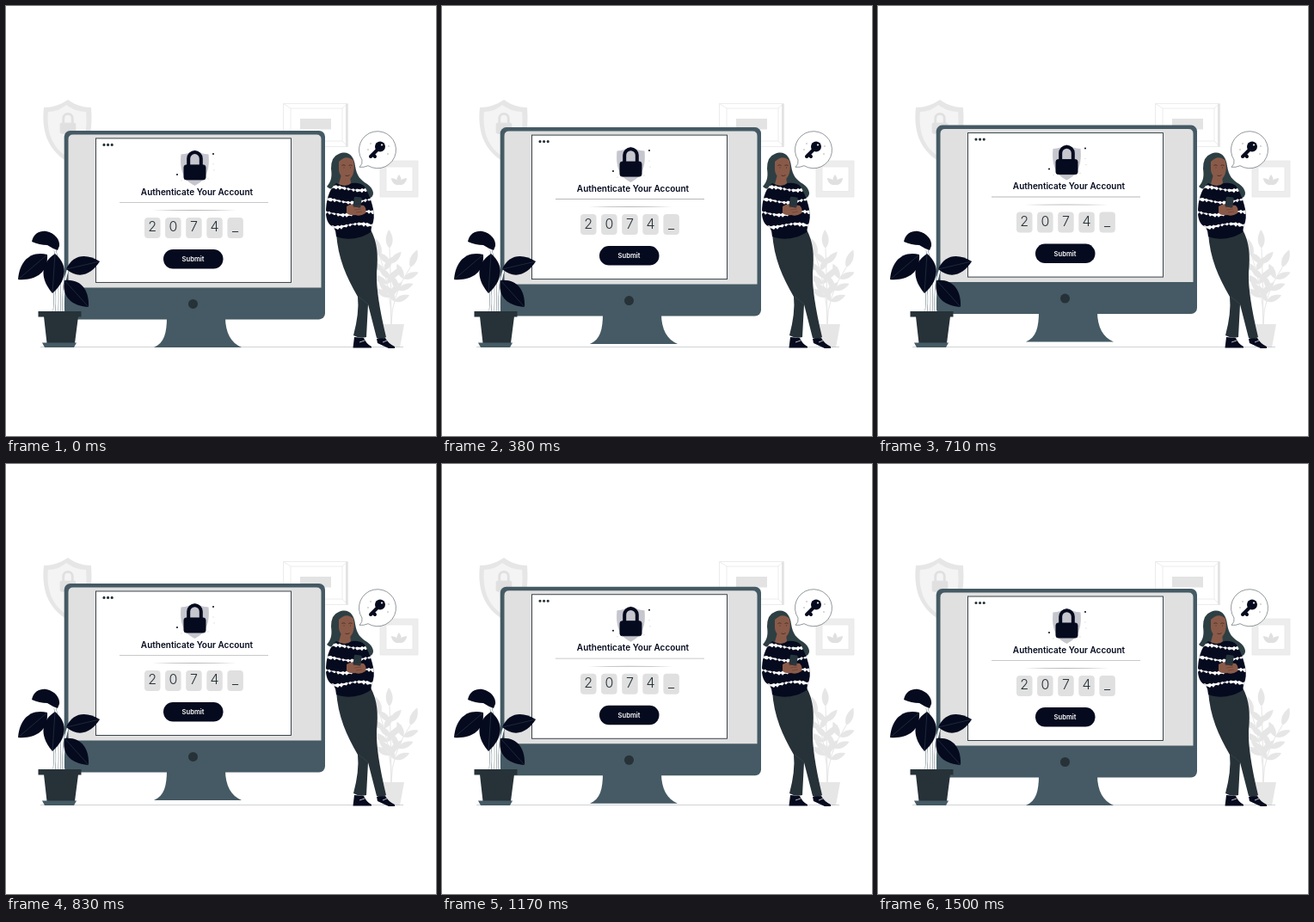
An HTML page that plays this animation: 500x500 px, repeating every 1540 ms.

```html
<!DOCTYPE html>
<html lang="en">
<head>
<meta charset="utf-8">
<title>Authenticate Your Account</title>
<style>
  html, body { margin: 0; height: 100%; overflow: hidden; background: #fff; }
  svg { display: block; width: 100vw; height: 100vh; }
  text { font-family: Inter, sans-serif; text-anchor: middle; }
  .navy { fill: #050a1e; }
  .dark { fill: #263238; }
  .slate { fill: #455a64; }
  .skin { fill: #8a5a49; }
  .hair { fill: #2d3f43; }
  .pale { fill: #e6e6e6; }
  .line { fill: none; stroke: #455a64; stroke-width: .4; }
</style>
</head>
<body>
<svg viewBox="0 0 500 500">
  <defs>
    <path id="leaf" d="M0 0C-8-6-6-14 0-20C6-14 8-6 0 0Z"/>
    <g id="padlock">
      <path fill="none" stroke-width="4" d="M-7.300 2V-7.500a7.300 7.300 0 0 1 14.600 0V2"/>
      <rect x="-12.500" width="25" height="17" rx="2.500"/>
    </g>
  </defs>

  <!-- wall shield -->
  <g id="wallShield" transform="translate(72 145)">
    <path id="shield" fill="#e6e6e6" d="M0-36C8-30 18-27 27-27C29 1 26 23 0 36C-24 23-31-1-28-27C-18-27-9-30 0-36Z"/>
    <use href="#padlock" transform="translate(0 -9) scale(.72)" fill="#e0e0e0" stroke="#e0e0e0"/>
  </g>
  <path fill="#f4f4f4" d="M70 115C77 120 85 123 93 123C95 145 92 164 71 175C52 164 47 143 49 123C57 123 64 120 70 115Z"/>
  <use href="#padlock" transform="translate(72 136) scale(.72)" fill="#e0e0e0" stroke="#e0e0e0"/>

  <!-- wall pictures -->
  <g fill="#fff" stroke="#e8e8e8" stroke-width=".8">
    <path d="M322.500 113.500H397.500V163.500H322.500ZM331 119H391V157H331ZM322.500 113.500L331 119M391 119L397 113.500M391 157L397 163"/>
    <path fill="#ededed" d="M435 180H479V222H435Z"/>
    <path d="M442 187H473V215.500H442Z"/>
  </g>
  <path fill="#e3e3e3" d="M395 114h2.500v50h-2.500zM342 131h36v12.500h-36z"/>
  <g id="emblem" fill="#e0e0e0" transform="translate(457 208)"></g>

  <g id="palePlant" class="pale">
    <path d="M432 370H463L458 397H438Z"/>
  </g>
  <path fill="none" stroke="#b9c0c4" stroke-width=".7" d="M40 396.500H462"/>

  <g id="monitor">
    <path class="slate" d="M187 362C187 380 184 392 172 397H274C262 392 255 380 255 362Z"/>
    <rect class="slate" x="67.700" y="145" width="303.300" height="219.500" rx="7"/>
    <path fill="#e0e0e0" d="M72.500 327.500V155Q72.500 149.500 78 149.500H361Q366.500 149.500 366.500 155V327.500Z"/>
    <circle class="dark" cx="217.500" cy="346.500" r="5.500"/>
    <rect x="104.500" y="154" width="227" height="167.500" fill="#fff" stroke="#263238" stroke-width=".9"/>
    <path stroke="#263238" stroke-width="3.200" stroke-linecap="round" d="M114 161.500h0m4.600 0h0m4.600 0h0"/>
    <use href="#shield" transform="translate(219.500 188) scale(.56)" opacity=".99"/>
    <path fill="#c6c6ce" d="M219.500 167.500Q226 172 235.500 172.500C237 189 234 202 219.500 209C205 202 202 189 203.500 172.500Q213 172 219.500 167.500Z"/>
    <use href="#padlock" class="navy" stroke="#050a1e" transform="translate(219.500 185)"/>
    <path stroke="#050a1e" stroke-width="2" stroke-linecap="round" d="M241 172h0M199 196h0"/>
    <path stroke="#8c8f98" stroke-width=".6" stroke-linecap="round" d="M241 184h0M242 191h0M235 201h0M204 203h0"/>
    <text class="navy" x="222" y="219.700" font-size="10" font-weight="600">Authenticate Your Account</text>
    <path fill="#b8b8b8" d="M132 228h173v.8h-173zM170 237.500Q218 236.500 268 237.500Q218 238.500 170 237.500Z"/>
    <g id="code"></g>
    <rect class="navy" x="183" y="283" width="69.500" height="22.500" rx="11.200"/>
    <text x="217.500" y="297" font-size="7.600" font-weight="600" fill="#fff">Submit</text>
  </g>

  <!-- potted plant -->
  <path id="stems" fill="none" stroke="#455a64" stroke-width="2.800" d="M56 355Q58 335 55 325M62 355C63 325 61 300 57 284M67 355Q66 320 73 304"/>
  <use href="#stems" style="stroke:#fff" transform="translate(.3 0)" stroke="#fff" opacity="0"/>
  <path fill="none" stroke="#fff" stroke-width="2.100" d="M56 355Q58 335 55 325M62 355C63 325 61 300 57 284M67 355Q66 320 73 304"/>
  <path class="navy" d="M30 274C32 264 40 261 47 262C57 264 63 272 62 279L60 284Q54 282 48 278Q39 278 30 274Z"/>
  <g id="plant" class="navy"></g>
  <path class="dark" d="M37.500 355H87.500V361.500H37.500ZM44 361H84L80 392H47.500Z"/>
  <path class="slate" d="M42 391.500H82L79 397H45Z"/>

  <!-- woman -->
  <path class="hair" d="M387 172C398 167 405 175 406 186C408 198 412 202 420 207C428 213 429 220 424 223C417 225 410 221 405 217L385 212Q378 215 373 210C379 203 379 197 378 189Q378 175 387 172Z"/>
  <path class="skin" d="M390 196L387 207Q394 213 401 206L400 198Z"/>
  <path class="skin" d="M387 181Q396 172 404 180C406 190 404 198 399 202C392 202 387 196 387 190Z"/>
  <path fill="none" stroke="#35201f" stroke-width=".7" d="M390.500 185.500q2-1.500 4 0M398.500 185.500q2-1.300 4 0M392.500 188h1M400 188h1M394.500 197q3 1.500 5-.500"/>
  <path class="dark" d="M384 264C396 270 412 269 424 260C432 275 433 290 431 310Q430 335 442 385Q436 389 431 386L421 347L419 385Q411 387 404 383Q411 357 409 338C396 315 386 294 384 264Z"/>
  <path class="line" d="M410 338Q416 342 421 347"/>
  <path id="sweater" class="navy" d="M384 206C375 213 372 228 372 240C372 250 376 255 381 257Q384 262 384 268C396 273 412 271 424 263Q425 256 427 251C430 240 424 222 417 210Q412 205 402 206Q394 212 384 206Z"/>
  <clipPath id="body"><use href="#sweater"/></clipPath>
  <g id="stripes" clip-path="url(#body)" fill="#fff"></g>
  <path class="skin" d="M396 233Q402 229 407 231L416 232Q420 236 418 241Q412 245 406 243Q398 244 396 240Z"/>
  <rect x="404" y="222" width="9" height="12" rx="1.500" fill="#26343c" transform="rotate(8 408 229)"/>
  <path fill="none" stroke="#5c352d" stroke-width=".5" d="M404 234l8-2M405 237l8-1M407 240l7-1"/>
  <path class="navy" d="M405 385L416 386Q419 393 425 396V397.500H403.500ZM431 387L441 386Q445 393 452 396V398H445L432 392Z"/>
  <path fill="none" stroke="#fff" stroke-width=".7" d="M411 391l6-2M438 391l5-2"/>

  <!-- thought bubble -->
  <path fill="#fff" stroke="#263238" stroke-width=".5" d="M414 179A21.500 21.500 0 1 1 421 185.700Q416 188 411 187.300Q415 184 414 179Z"/>
  <path fill="none" stroke="#050a1e" stroke-width="4" stroke-linecap="round" d="M433 166L424 175M427 173l2 2"/>
  <circle class="navy" cx="435" cy="163.500" r="6"/>
  <circle cx="437" cy="161.500" r="1.100" fill="#fff"/>
  <path stroke="#263238" stroke-width=".9" stroke-linecap="round" d="M424 160h0M444 172h0M421 167h0M445 163h0"/>
</svg>
<script>
const $ = id => document.getElementById(id);
const add = (id, markup) => $(id).insertAdjacentHTML('beforeend', markup);
const leaf = (id, x, y, angle, scale) =>
  add(id, `<use href="#leaf" transform="translate(${x} ${y}) rotate(${angle}) scale(${scale})"/>`);

[...'2074_'].forEach((char, i) => {
  const x = 161 + i * 24.1;
  add('code', `<rect x="${x}" y="246" width="18.5" height="24" rx="4" fill="#e0e0e0"/>
    <text class="dark" x="${x + 9.25}" y="262.5" font-size="16" font-weight="300">${char}</text>`);
});

for (const angle of [-50, 0, 50]) leaf('emblem', 0, 0, angle, '.5 .6');

// stems bend sideways with the square of their height and carry leaf pairs
for (const [lean, height] of [[-13, 78], [-2, 88], [22, 66]]) {
  add('palePlant', `<path fill="none" stroke="#e6e6e6" d="M448 370q0 ${-height / 2} ${lean} ${-height}"/>`);
  for (let k = 0.4; k < 1; k += 0.2)
    for (const side of [-45, 45])
      leaf('palePlant', 448 + lean * k * k, 370 - height * k, lean + side, '.65 .95');
  leaf('palePlant', 448 + lean, 370 - height, lean, '.75 1.1');
}

// dark leaves, each from its base to its tip
function darkLeaf(x, y, tipX, tipY) {
  const dx = tipX - x, dy = tipY - y;
  leaf('plant', x, y, Math.atan2(dx, -dy) * 180 / Math.PI, Math.hypot(dx, dy) / 20);
  add('plant', `<path class="line" d="M${x} ${y}L${tipX} ${tipY}"/>`);
}
darkLeaf(48, 289, 14, 318);
darkLeaf(57, 288, 54, 334);
darkLeaf(70, 306, 109, 297);
darkLeaf(68, 319, 96, 350);

// ragged knit stripes
for (let row = 0; row < 4; row++) {
  const y = 212 + row * 14.3;
  let top = '', bottom = '';
  for (let x = 370; x <= 430; x += 2) {
    const mid = y + 2 * Math.sin(x / 9 + row);
    const half = 1.3 + Math.sin(x * 1.9 + row * 5) + 0.5 * Math.sin(x / 5 + row * 2);
    top += `L${x} ${mid - Math.max(0, half) * 0.7}`;
    bottom = `L${x} ${mid + Math.max(0, half) * 1.3}` + bottom;
  }
  add('stripes', `<path d="M${(top + bottom).slice(1)}Z"/>`);
}

const PERIOD = 1540, PEAK = 712, LIFT = 6.4;
function draw(now) {
  const lift = LIFT * (1 + Math.cos(2 * Math.PI * (now - PEAK) / PERIOD)) / 2;
  $('monitor').setAttribute('transform', `translate(0 ${-lift})`);
  requestAnimationFrame(draw);
}
requestAnimationFrame(draw);
</script>
</body>
</html>
```
